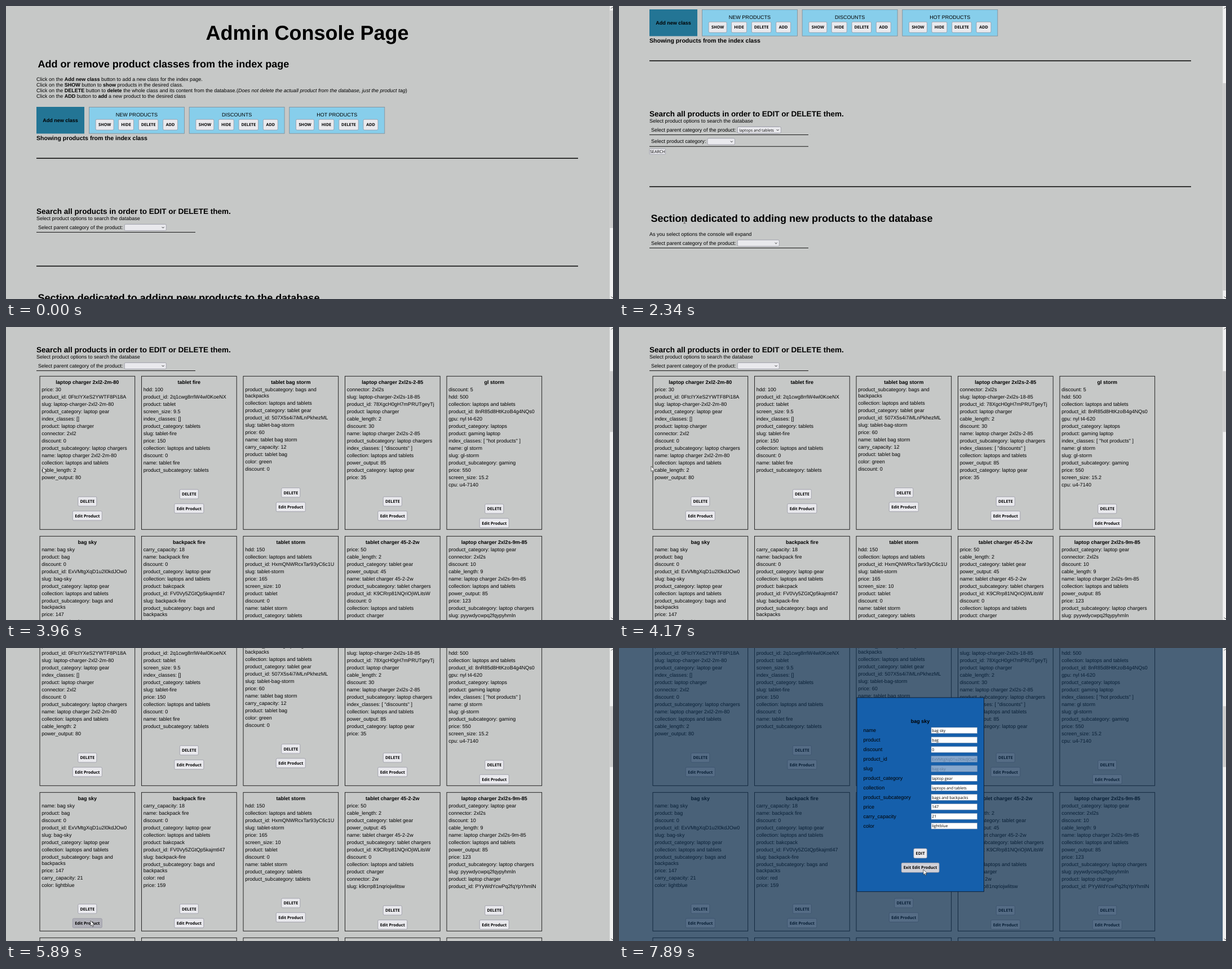
Animation, 1077 px wide and 520 px high, one loop 8 s. Source, as an HTML page:

```html
<!DOCTYPE html>
<html lang="en">
<head>
<meta charset="utf-8">
<title>Admin Console Page</title>
<style>
  html, body { margin: 0; width: 100%; height: 100%; overflow: hidden; background: #c6c8c7; }
  svg { display: block; width: 1077px; height: 520px; }
  text { font-family: "Liberation Sans", Arial, sans-serif; text-rendering: geometricPrecision; white-space: pre; }
  .ui { font-family: "Open Sans", sans-serif; }
  .b { font-weight: 700; }
  .i { font-style: italic; }
  .box { fill: #e9e9ed; stroke: #8f8f9d; stroke-width: .7; }
  .hover { fill: #d0d0d7; }
  .press { fill: #b1b1b9; }
  .card { fill: none; stroke: #111; stroke-width: .9; }
  .panel { fill: #87ceeb; stroke: #7d8a94; stroke-width: .8; }
</style>
</head>
<body>
<svg id="stage" viewBox="0 0 1077 520" xmlns="http://www.w3.org/2000/svg"></svg>
<script>
const BODY = 9.04, BTN = 7.25, FIELD = 6.9;

// *bold* and ~italic~ inline marks
const rich = s => s.replace(/\*(.+?)\*/g, '<tspan class="b">$1</tspan>')
                   .replace(/~(.+?)~/g, '<tspan class="i">$1</tspan>');

// text placed by the vertical middle of its capitals
const text = (x, y, s, size = BODY, cls = '', anchor = 'start', fill = '#000') =>
  `<text x="${x}" y="${y + size * .36}" font-size="${size}" class="${cls}" text-anchor="${anchor}" fill="${fill}">${s}</text>`;

const rect = (x, y, w, h, attrs) => `<rect x="${x}" y="${y}" width="${w}" height="${h}" ${attrs}/>`;

const button = (cx, cy, w, h, label) =>
  rect(cx - w / 2, cy - h / 2, w, h, 'rx="2" class="box btn"') + text(cx, cy, label, BTN, 'ui b', 'middle');

const rule = (y, x2 = 336, h = .9) => rect(54, y - h / 2, x2 - 54, h, '');

const select = (x, y, w, value = '') =>
  rect(x, y - 5.6, w, 11.2, 'rx="2" class="box"') + text(x + 3, y + .2, value, FIELD, 'ui') +
  `<path d="M${x + w - 7.6} ${y - .8}l1.9 1.9 1.9-1.9" fill="none" stroke="#111" stroke-width=".9"/>`;

const parentRow = y => text(57, y, 'Select parent category of the product:') +
  select(210.3, y + .4, 74) + rule(y + 9);

const classPanel = (name, i) => {
  const x = 147.4 + i * 177.7;
  return rect(x, 179.4, 169, 46.8, 'class="panel"') + text(x + 84.5, 193, name, BODY, '', 'middle') +
    button(x + 27.7, 210.7, 32, 18.8, 'SHOW') + button(x + 65.6, 210.7, 27, 18.8, 'HIDE') +
    button(x + 105.2, 210.7, 34.5, 18.8, 'DELETE') + button(x + 144.2, 210.7, 26, 18.8, 'ADD');
};

const rows = [
  { top: 411, h: 272, cards: [
    'laptop charger 2xl2-2m-80|price: 30|product_id: 0FtcIYXeS2YWTF8Pi18A|slug: laptop-charger-2xl2-2m-80|product_category: laptop gear|index_classes: []|product: laptop charger|connector: 2xl2|discount: 0|product_subcategory: laptop chargers|name: laptop charger 2xl2-2m-80|collection: laptops and tablets|cable_length: 2|power_output: 80',
    'tablet fire|hdd: 100|product_id: 2q1cwg8rrlW4wl0KoeNX|product: tablet|screen_size: 9.5|index_classes: []|product_category: tablets|slug: tablet-fire|price: 150|collection: laptops and tablets|discount: 0|name: tablet fire|product_subcategory: tablets',
    'tablet bag storm|product_subcategory: bags and/backpacks|collection: laptops and tablets|product_category: tablet gear|product_id: 507X5s4i7iMLnPkhezML|slug: tablet-bag-storm|price: 60|name: tablet bag storm|carry_capacity: 12|product: tablet bag|color: green|discount: 0',
    'laptop charger 2xl2s-2-85|connector: 2xl2s|slug: laptop-charger-2xl2s-18-85|product_id: 78XgcH0gH7mPRUTgeyTj|product: laptop charger|cable_length: 2|discount: 30|name: laptop charger 2xl2s-2-85|product_subcategory: laptop chargers|index_classes: [ "discounts" ]|collection: laptops and tablets|power_output: 85|product_category: laptop gear|price: 35',
    'gl storm|discount: 5|hdd: 500|collection: laptops and tablets|product_id: 8nR85d8HtKzoB4g4NQs0|gpu: nyl t4-620|product_category: laptops|product: gaming laptop|index_classes: [ "hot products" ]|name: gl storm|slug: gl-storm|product_subcategory: gaming|price: 550|screen_size: 15.2|cpu: u4-7140'] },
  { top: 695, h: 246, cards: [
    'bag sky|name: bag sky|product: bag|discount: 0|product_id: ExVMtgXqD1u2l0kdJOw0|slug: bag-sky|product_category: laptop gear|collection: laptops and tablets|product_subcategory: bags and/backpacks|price: 147|carry_capacity: 21|color: lightblue',
    'backpack fire|carry_capacity: 18|name: backpack fire|discount: 0|product_category: laptop gear|collection: laptops and tablets|product: bakcpack|product_id: FV0Vy5ZGtQp5kajmtl47|slug: backpack-fire|product_subcategory: bags and/backpacks|color: red|price: 159',
    'tablet storm|hdd: 150|collection: laptops and tablets|product_id: HxmQNWRcxTar93yC6c1U|slug: tablet-storm|price: 165|screen_size: 10|product: tablet|discount: 0|name: tablet storm|product_category: tablets|product_subcategory: tablets',
    'tablet charger 45-2-2w|price: 50|cable_length: 2|product_category: tablet gear|power_output: 45|name: tablet charger 45-2-2w|product_subcategory: tablet chargers|product_id: K9CRrp81NQriOjWLitsW|discount: 0|collection: laptops and tablets|product: charger|connector: 2w|slug: k9crrp81nqriojwlitsw',
    'laptop charger 2xl2s-9m-85|product_category: laptop gear|connector: 2xl2s|discount: 10|cable_length: 9|name: laptop charger 2xl2s-9m-85|collection: laptops and tablets|power_output: 85|price: 123|product_subcategory: laptop chargers|slug: pyywdycwpq2fqypyhmln|product: laptop charger|product_id: PYyWdYcwPq2fqYpYhmlN'] },
  { top: 953, h: 250, cards: ['', '', '', '', ''] }
];

const card = (data, i, top, h) => {
  const x = 60 + i * 180.5, mid = x + 84.3;
  let out = rect(x, top + .3, 168.7, h, 'class="card"');
  if (!data) return out;
  const [title, ...lines] = data.split('|');
  out += text(mid, top + 11.2, title, BODY, 'b', 'middle');
  let y = top + 11.2;
  for (const line of lines) {
    y += 13;
    line.split('/').forEach((part, k) => {
      if (k) y += 10.3;
      out += text(x + 3.2, y, part);
    });
  }
  return out + button(mid, y + 42.4, 33, 16.6, 'DELETE') + button(mid, y + 67.8, 52, 16.6, 'Edit Product');
};

const help = [
  'Click on the *Add new class* button to add a new class for the index page.',
  'Click on the *SHOW* button to *show* products in the desired class.',
  'Click on the *DELETE* button to *delete* the whole class and its content from the database.(~Does not delete the actuall product from the database, just the product tag~)',
  'Click on the *ADD* button to *add* a new product to the desired class'
];

const upper = text(534.5, 47.5, 'Admin Console Page', 36, 'b', 'middle') +
  text(56.5, 102.2, 'Add or remove product classes from the index page', 18.05, 'b') +
  help.map((s, i) => text(54, 129.6 + i * 10.2, rich(s))).join('') +
  rect(54, 179, 85, 47.5, 'fill="#237595"') + text(96.5, 203, 'Add new class', BODY, 'b', 'middle') +
  ['NEW PRODUCTS', 'DISCOUNTS', 'HOT PRODUCTS'].map(classPanel).join('') +
  text(54, 234.6, 'Showing products from the index class', 10.55, 'b') + rule(270.3, 1015, 1.5) +
  text(54, 364, 'Search all products in order to EDIT or DELETE them.', 13.52, 'b') +
  text(54, 377, 'Select product options to search the database') + parentRow(392.6);

const extra = select(210.3, 393, 77, 'laptops and tablets') +
  text(57, 413, 'Select product category:') + select(157, 413.5, 48.5) + rule(422.2) +
  rect(54.2, 426.2, 28.3, 10, 'rx="1" class="box btn"') + text(68.4, 431.2, 'SEARCH', BTN, 'ui', 'middle');

const popup = rect(210.5, 399, 77, 23, 'fill="#f4f4f6" stroke="#8f8f9d" stroke-width=".7"') +
  '<g id="option">' + rect(211, 410.5, 76, 11, '') + text(213.3, 416, 'laptops and tablets', FIELD, 'ui', 'start', 'inherit') + '</g>';

const lower = rule(461.6, 1015, 1.5) +
  text(56.5, 518, 'Section dedicated to adding new products to the database', 18.05, 'b') +
  text(54, 545.4, 'As you select options the console will expand') + parentRow(561.4);

const fields = 'name:bag sky|product:bag|discount:0|product_id:ExVMtgXqD1u2l0kdJOw0|slug:bag-sky|product_category:laptop gear|collection:laptops and tablets|product_subcategory:bags and backpacks|price:147|carry_capacity:21|color:lightblue';

const field = (entry, i) => {
  const [key, value] = entry.split(':'), y = 146.2 + i * 16.95, off = key === 'product_id' || key === 'slug';
  return text(433.5, y - .2, key) +
    rect(554, y - 5.2, 81.6, 10.6, `fill="${off ? '#86a7cd' : '#fff'}" stroke="#7c8ea8" stroke-width=".6"`) +
    `<g clip-path="url(#input)">${text(555.3, y + .2, value, FIELD, 'ui', 'start', off ? '#5d7899' : '#000')}</g>`;
};

const modal = rect(0, 0, 1071.3, 520, 'fill="#0a2c4f" fill-opacity=".66"') +
  rect(422, 88, 225.5, 344.3, 'fill="#155fab" stroke="#0b1a2c" stroke-width=".9"') +
  text(534.5, 130, 'bag sky', BODY, 'b', 'middle') + fields.split('|').map(field).join('') +
  button(534.6, 364.4, 23.5, 17, 'EDIT') + button(534.6, 389.8, 67, 17, 'Exit Edit Product');

const scrollbar = rect(1071.3, 0, 6, 520, 'fill="#f0f0f0"') + rect(1071.3, 8, 6, 100, 'id="thumb" fill="#cdcdcd"') +
  '<path d="M1073.6 4.6l2.4-2.4 2.4 2.4M1073.6 515.6l2.4 2.4 2.4-2.4" fill="none" stroke="#505050"/>';

const $ = id => document.getElementById(id);
const group = (id, body) => `<g id="${id}">${body}</g>`;
$('stage').innerHTML =
  '<clipPath id="input"><rect x="554" y="130" width="81.2" height="200"/></clipPath>' +
  rect(0, 0, 1077, 520, 'fill="#c6c8c7"') +
  group('page', upper + group('extra', extra) + group('lower', lower) +
    group('results', rows.map(r => r.cards.map((c, i) => card(c, i, r.top, r.h)).join('')).join('')) +
    group('popup', popup)) +
  group('modal', modal) + scrollbar +
  group('arrow', '<path d="M0 0V9.4L2.2 7.4 3.7 10.8 5.2 10.1 3.8 6.9H6.7Z" fill="#fff" stroke="#111" stroke-width=".6"/>') +
  group('beam', '<path d="M-1.8-4.5H-.5L0-4 .5-4.5H1.8M0-4V4M-1.8 4.5H-.5L0 4 .5 4.5H1.8" fill="none" stroke="#222" stroke-width=".7"/>');

// the screen refreshes only in these bursts: first, last, count
const bursts = [[100, 800, 8], [920, 1520, 7], [1730, 1930, 3], [2230, 2830, 7], [3040, 3140, 2], [3340, 3340, 1],
  [3660, 4170, 6], [4460, 5160, 8], [5270, 5670, 5], [5890, 5980, 2], [6190, 6990, 9], [7100, 7890, 9]];
const ticks = [0];
for (const [a, b, n] of bursts)
  for (let i = 0; i < n; i++) ticks.push(n > 1 ? Math.floor((a + (b - a) * i / (n - 1)) / 10) * 10 : a);

const scrollKeys = [[2130, 0], [2320, 173], [3139, 173], [3140, 151], [3560, 151], [3960, 324], [4360, 324], [4660, 439]];
const mouseKeys = [[100, 767, 421], [800, 255, 394], [1520, 262, 416], [1930, 258, 420], [2320, 117, 384], [2830, 81, 254],
  [3560, 81, 254], [4170, 57, 247], [4360, 57, 247], [4660, 105, 302], [5160, 127, 456], [5670, 150, 484],
  [5980, 150, 484], [6590, 590, 147], [6990, 552, 357], [7500, 536, 367], [7790, 544, 396], [7890, 540, 393]];
const beamSpans = [[2300, 2500], [4600, 5100], [6550, 6750]];
const pressSpans = [[3040, 3140], [5890, 5980]];

const within = (spans, t) => spans.some(([a, b]) => t >= a && t < b);

// linear value of column k at time t
const along = (keys, t, k) => {
  const n = keys.findIndex(key => key[0] > t);
  if (n === 0) return keys[0][k];
  if (n < 0) return keys[keys.length - 1][k];
  const a = keys[n - 1], b = keys[n];
  return a[k] + (b[k] - a[k]) * (t - a[0]) / (b[0] - a[0]);
};

const show = (id, on) => $(id).setAttribute('visibility', on ? 'visible' : 'hidden');
const move = (id, x, y) => $(id).setAttribute('transform', `translate(${x} ${y})`);

const boxes = [...document.querySelectorAll('.btn')].map(el => ({
  el, modal: !!el.closest('#modal'),
  x: +el.getAttribute('x'), y: +el.getAttribute('y'),
  w: +el.getAttribute('width'), h: +el.getAttribute('height')
}));

function draw(t) {
  const scroll = along(scrollKeys, t, 1), x = along(mouseKeys, t, 1), y = along(mouseKeys, t, 2);
  const expanded = t >= 1730 && t < 3140, found = t >= 3340, editing = t >= 5980;
  const beam = within(beamSpans, t), pressed = within(pressSpans, t);

  move('page', 0, -scroll);
  move('lower', 0, expanded ? 32 : 0);
  show('extra', expanded);
  show('lower', !found);
  show('results', found);
  show('popup', t >= 920 && t < 1730);
  show('modal', editing);

  const picked = y > 409;
  $('option').firstChild.setAttribute('fill', picked ? '#0078d7' : 'none');
  $('option').lastChild.setAttribute('fill', picked ? '#fff' : '#000');

  const [rate, size] = found ? [.217, 108] : expanded ? [.745, 368] : [.78, 386];
  $('thumb').setAttribute('y', 8 + scroll * rate);
  $('thumb').setAttribute('height', size);

  for (const b of boxes) {
    const dy = y + (b.modal ? 0 : scroll) - b.y, dx = x - b.x;
    const over = b.modal === editing && dx > 0 && dx < b.w && dy > 0 && dy < b.h;
    b.el.classList.toggle('hover', over);
    b.el.classList.toggle('press', over && pressed);
  }
  show('arrow', t >= 100 && !beam);
  show('beam', beam);
  move('arrow', x, y);
  move('beam', x, y);
}

let last = -1;
function loop() {
  const now = performance.now() % 8000;
  const t = ticks.filter(v => v <= now + .5).pop();
  if (t !== last) draw(last = t);
  requestAnimationFrame(loop);
}
loop();
</script>
</body>
</html>
```
